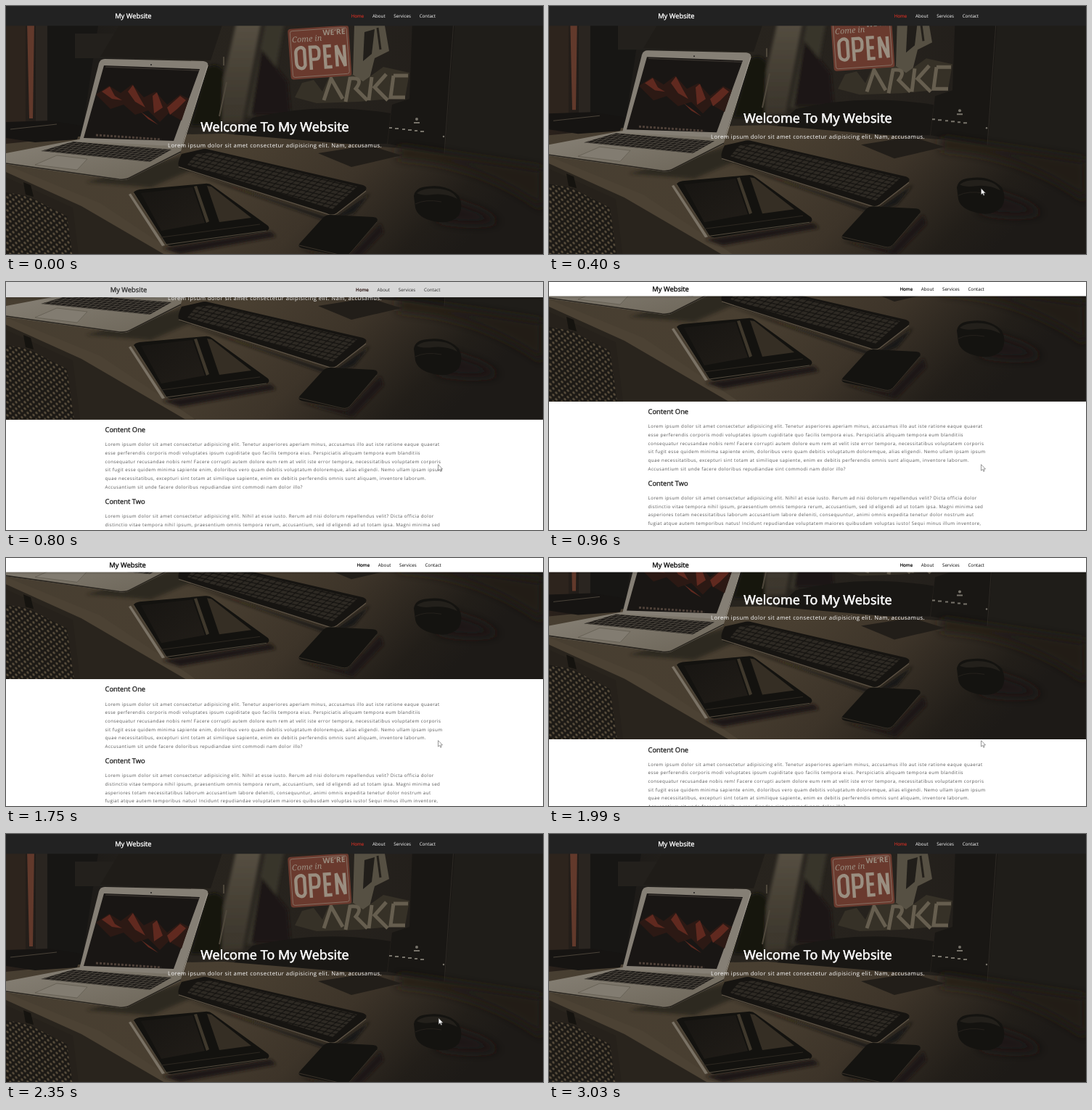
An HTML page for the animation above (3730 ms loop, 740 by 342 pixels).

```html
<!DOCTYPE html>
<html lang="en">
<head>
<meta charset="utf-8">
<title>My Website</title>
<style>
  * { box-sizing: border-box; margin: 0; padding: 0; }
  html, body { width: 100%; height: 100%; overflow: hidden; background: #fff; }
  body { position: relative; font: 16px "Open Sans", sans-serif; text-rendering: geometricPrecision; }
  #page { position: absolute; left: 0; top: 0; width: 1900px; height: 880px; overflow: hidden;
    transform: scale(.39); transform-origin: 0 0; color: #222; }
  #scroll { position: absolute; left: 0; top: 0; width: 100%; }
  .fat { font-weight: 400; -webkit-text-stroke: .035em currentColor; }
  .box { width: 1200px; margin: 0 auto; }

  nav { position: absolute; left: 0; top: 0; width: 100%; }
  nav .box { display: flex; justify-content: space-between; align-items: center; height: 100%; }
  nav h1 { font-size: 24px; }
  nav ul { display: flex; gap: 30px; list-style: none; }

  .hero { position: relative; height: 922px; color: #fff; text-align: center; padding-top: 396px; overflow: hidden; }
  .hero svg { position: absolute; left: 0; top: 0; width: 1897.4px; height: 922px; }
  .hero { background: #1e1b17; }
  .hero h1, .hero p { position: relative; white-space: nowrap; }
  .hero h1 { font-size: 46px; line-height: 63px; letter-spacing: .25px; margin-bottom: 20px; }
  .hero p { font-size: 20px; line-height: 27px; letter-spacing: 1px; }

  .content { display: flow-root; }
  .content h2 { font-size: 24px; line-height: 33px; margin: 20px 0; }
  .content p { color: #555; line-height: 30px; letter-spacing: 1.2px; white-space: nowrap; }

  #cursor { position: absolute; left: 0; top: 0; width: 8px; height: 12px; overflow: visible; }
</style>
</head>
<body>
<div id="page">
  <div id="scroll">
    <section class="hero">
      <svg viewBox="0 0 740 359.6" preserveAspectRatio="none">
        <defs>
          <linearGradient id="wall">
            <stop offset="0" stop-color="#2a211b"/><stop offset=".1" stop-color="#1b1917"/>
            <stop offset=".35" stop-color="#28241e"/><stop offset=".6" stop-color="#26221d"/>
            <stop offset="1" stop-color="#1f1c19"/>
          </linearGradient>
          <linearGradient id="desk" x1="0" y1="0" x2="1" y2=".25">
            <stop offset="0" stop-color="#473e31"/><stop offset=".45" stop-color="#493f31"/>
            <stop offset=".68" stop-color="#3d3429"/><stop offset=".9" stop-color="#221e19"/>
            <stop offset="1" stop-color="#1d1a17"/>
          </linearGradient>
          <linearGradient id="metal" x1="0" y1="0" x2="1" y2="1">
            <stop offset="0" stop-color="#878176"/><stop offset="1" stop-color="#6c6558"/>
          </linearGradient>
          <linearGradient id="glass" x1="0" y1="0" x2="1" y2="1">
            <stop offset="0" stop-color="#171512"/><stop offset="1" stop-color="#211d18"/>
          </linearGradient>
          <linearGradient id="sheen" x1="0" y1="0" x2="0" y2="1">
            <stop offset="0" stop-color="#645c4d" stop-opacity=".8"/><stop offset="1" stop-color="#4a4336" stop-opacity=".55"/>
          </linearGradient>
          <pattern id="keys" width="9" height="7" patternUnits="userSpaceOnUse" patternTransform="matrix(.97 .235 -.72 .6 250 205)">
            <rect x=".7" y=".7" width="7.6" height="5.4" rx="1" fill="#2d2923"/>
          </pattern>
          <pattern id="caps" width="7.2" height="5" patternUnits="userSpaceOnUse" patternTransform="matrix(.99 .1 -.85 .5 100 187)">
            <rect width="7.2" height="5" fill="#5d574d"/><rect x=".4" y=".4" width="6.3" height="4.1" fill="#1f1c19"/>
          </pattern>
          <pattern id="holes" width="8" height="9" patternUnits="userSpaceOnUse" patternTransform="skewY(20)">
            <circle cx="2" cy="2.2" r="1.7" fill="#584d3c"/><circle cx="6" cy="6.7" r="1.7" fill="#584d3c"/>
          </pattern>
          <filter id="edge"><feGaussianBlur stdDeviation=".7"/></filter>
          <filter id="soft" x="-30%" y="-30%" width="160%" height="160%"><feGaussianBlur stdDeviation="2"/></filter>
          <filter id="haze" x="-50%" y="-50%" width="200%" height="200%"><feGaussianBlur stdDeviation="7"/></filter>
        </defs>

        <rect width="740" height="360" fill="url(#wall)"/>
        <g filter="url(#edge)">
          <path d="M0 20H27V165H0z" fill="#2d241d"/>
          <path d="M29 20H39L37 155H32z" fill="#62392b"/>
          <path d="M41 20H57V160H41z" fill="#2a2520"/>
          <path d="M57 20H128L104 180H57z" fill="#171614"/>
          <path d="M95 38H158V72H95z" fill="#23201c"/>
          <path d="M160 20H300L282 75 130 70z" fill="#1f1c18"/>
        </g>
        <g filter="url(#soft)">
          <path d="M318 20H352L326 160 284 162 300 100z" fill="url(#sheen)"/>
          <path d="M358 20H384L366 120 340 152H332z" fill="#39342a"/>
          <path d="M276 85Q292 76 300 90L297 165H254z" fill="#151311"/>
          <path d="M352 60L388 104 392 150H338z" fill="#1c1916"/>
        </g>
        <g filter="url(#edge)">
          <path d="M300 82V70M304 105L294 152" stroke="#4f483c" stroke-width="2"/>
          <path d="M480 27H522L528 62 508 72 498 112 478 96z" fill="#565043"/>
          <path d="M494 36L508 32 504 66 492 76z" fill="#211e1a"/>
          <path d="M512 30L516 60" stroke="#24201b" stroke-width="3"/>
          <path d="M398 126L408 106 424 102 436 118 446 96 474 92 492 104 520 84 556 92 550 126 486 132 428 134z" fill="#363127"/>
          <path d="M438 130L448 100 464 128M468 132L474 100Q494 98 482 114L498 130M504 98L500 130M524 94L508 112 526 130M534 96H554M534 96L530 126H550" fill="none" stroke="#665e4f" stroke-width="5"/>
          <path d="M340 154Q430 132 530 148L525 190H300z" fill="#191714"/>
        </g>
        <path d="M560 20H619L605 204 526 190 532 136 556 128z" fill="#191714"/>
        <path d="M619 20H740V240L605 205z" fill="#1f1d19"/>
        <path d="M617 20L604 204" stroke="#2f2b26" stroke-width="1"/>
        <g fill="#77736a">
          <circle cx="566" cy="156" r="2"/><path d="M562 160h8v2h-8zM528 167h4v2h-4zM536 168h5v2h-5zM546 169h4v2h-4zM554 170h5v2h-5zM563 171h4v2h-4zM571 172h5v2h-5z"/>
          <circle cx="603" cy="180" r="1.2"/>
        </g>

        <g transform="translate(388 32) rotate(-4)">
          <rect width="84" height="70" rx="4" fill="#6a3a2e"/>
          <rect x="3" y="3" width="78" height="64" rx="3" fill="none" stroke="#8c7a6c" stroke-width=".8"/>
          <g fill="#9a8e80" font-family="Open Sans, sans-serif">
            <text x="5" y="19" font-size="11" font-style="italic" font-family="Noto Serif, serif">Come in</text>
            <text x="48" y="12" font-size="10.5" font-weight="700">WE’RE</text>
          </g>
          <path d="M12 28Q18 24 21 30V51Q18 58 12 54Q9 52 9 46V34Q9 30 12 28zM29 58V27H37Q42 29 41 36Q41 44 36 44H29M58 27H49V56H58M49 41H57M65 56V27L76 56V27"
            fill="none" stroke="#9a8e80" stroke-width="4.4"/>
        </g>

        <path d="M0 190L100 180 300 176 540 196 740 226V360H0z" fill="url(#desk)"/>
        <path d="M540 194L740 224V280Q650 215 540 210z" fill="#211d18" filter="url(#haze)"/>
        <path d="M0 160L60 158 104 165 98 184 40 188 0 182z" fill="#161412"/>
        <path d="M6 170L70 163" stroke="#4b443a"/>

        <path d="M0 224L110 275 232 342 262 360H0z" fill="#29241d"/>
        <path d="M0 219L130 272 262 360H248L104 276 0 229z" fill="#4c4234"/>
        <path d="M0 236L92 278 102 360H0z" fill="#26211b"/>
        <path d="M0 257L30 262 84 290 94 360H0z" fill="#1c1915"/>
        <path d="M0 257L30 262 84 290 94 360H0z" fill="url(#holes)"/>
        <path d="M24 243L34 247 38 263 27 260z" fill="#15130f"/>

        <path d="M110 243L248 205 270 220 200 250z" fill="#1e1a16" opacity=".6" filter="url(#soft)"/>
        <path d="M0 203L100 184 243 194 240 203 172 237Q166 241 156 240L0 218z" fill="url(#metal)"/>
        <path d="M0 217L156 239Q166 240 172 236L241 201" fill="none" stroke="#28241e" stroke-width="1.6"/>
        <path d="M92 187L228 198 198 215 48 200z" fill="url(#caps)"/>
        <path d="M70 206L112 211 98 226 40 219z" fill="#827c71" stroke="#5a5449" stroke-width=".6"/>
        <path d="M136 73L272 76Q280 77 278 84L242 194 101 186 128 79Q130 73 136 73z" fill="#857f75"/>
        <path d="M278 82L243 194" stroke="#a09a8f" stroke-width="1"/>
        <path d="M135 82L267 87 231 186 107 182z" fill="#191614"/>
        <g filter="url(#edge)">
          <path d="M124 122L142 110 158 120 174 108 190 126 206 118 222 136 240 122 252 128 242 158 224 148 212 160 196 144 178 150 162 136 144 142z" fill="#2c1914"/>
          <path d="M132 118L143 111 150 124 160 130 146 128zM168 118L175 109 184 126 192 140 178 132zM202 124L208 119 216 140 204 148zM222 140L240 124 248 130 236 142 226 150zM186 146L200 156 210 164 196 156z" fill="#60291f"/>
        </g>
        <path d="M137 84L266 89" stroke="#37322d" stroke-width="1.4"/>
        <path d="M124 178L214 184" stroke="#4d4038" stroke-width="3" stroke-dasharray="3 2"/>
        <circle cx="200" cy="81" r="1" fill="#23211f"/>

        <path d="M430 203L500 192 545 206 476 222z" fill="#221e19" filter="url(#edge)"/>
        <path d="M236 224L450 294 502 258 480 285 448 298z" fill="#191612" filter="url(#soft)"/>
        <path d="M242 204L268 198Q274 196 280 198L492 247Q500 250 494 256L456 286Q450 290 442 287L240 224Q234 220 242 204z" fill="#161411"/>
        <path d="M262 204L286 202 484 249 450 280 250 219z" fill="url(#keys)"/>
        <path d="M238 222L443 287Q450 290 456 286L496 255" fill="none" stroke="#5d5345" stroke-width="1.3"/>

        <path d="M215 334L365 311 372 318 240 342z" fill="#1c1813" filter="url(#soft)"/>
        <path d="M169 260L172 258.5 219 330 215 331z" fill="#7a7265"/>
        <path d="M176 257Q178 254 184 253L274 245Q280 244 285 248L361 303Q365 308 358 311L228 331Q221 331 217 324z" fill="#13120f"/>
        <path d="M186 258L257 250 274 299 214 310z" fill="url(#glass)"/>
        <path d="M259 249L263 248 280 297 276 299z" fill="#3f382c"/>
        <path d="M277 248L283 249 338 292 294 298z" fill="#352e24"/>
        <path d="M176 258L221 329 359 310" fill="none" stroke="#544c3f" stroke-width="1"/>
        <path d="M214 319L350 301" stroke="#2e2922"/>

        <path d="M402 335L470 348 516 300 520 312 478 356z" fill="#1a1713" filter="url(#soft)"/>
        <path d="M436 293Q440 288 447 288L506 291Q514 292 511 298L476 340Q471 347 463 345L408 334Q401 332 405 327z" fill="#141310"/>
        <path d="M404 330L463 344Q471 346 476 339L511 298" fill="none" stroke="#3a332a" stroke-width="1"/>

        <path d="M590 294Q630 306 680 298L655 282 615 268z" fill="#1a1713" filter="url(#haze)"/>
        <path d="M562 262Q564 250 580 249Q608 245 624 262Q631 276 624 289Q612 302 590 297Q567 292 564 278z" fill="#141310"/>
        <path d="M566 258Q576 250 598 252Q616 254 622 266Q606 258 588 260Q574 262 566 258z" fill="#23201b"/>
        <path d="M564 273Q578 266 600 270" fill="none" stroke="#26221d" stroke-width="1"/>
      </svg>
      <h1 class="fat">Welcome To My Website</h1>
      <p>Lorem ipsum dolor sit amet consectetur adipisicing elit. Nam, accusamus.</p>
    </section>
    <section class="box content">
      <h2 class="fat">Content One</h2>
      <p>Lorem ipsum dolor sit amet consectetur adipisicing elit. Tenetur asperiores aperiam minus, accusamus illo aut iste ratione eaque quaerat<br>
      esse perferendis corporis modi voluptates ipsum cupiditate quo facilis tempora eius. Perspiciatis aliquam tempora eum blanditiis<br>
      consequatur recusandae nobis rem! Facere corrupti autem dolore eum rem at velit iste error tempora, necessitatibus voluptatem corporis<br>
      sit fugit esse quidem minima sapiente enim, doloribus vero quam debitis voluptatum doloremque, alias eligendi. Nemo ullam ipsam ipsum<br>
      quae necessitatibus, excepturi sint totam at similique sapiente, enim ex debitis perferendis omnis sunt aliquam, inventore laborum.<br>
      Accusantium sit unde facere doloribus repudiandae sint commodi nam dolor illo?</p>
      <h2 class="fat">Content Two</h2>
      <p>Lorem ipsum dolor sit amet consectetur adipisicing elit. Nihil at esse iusto. Rerum ad nisi dolorum repellendus velit? Dicta officia dolor<br>
      distinctio vitae tempora nihil ipsum, praesentium omnis tempora rerum, accusantium, sed id eligendi ad ut totam ipsa. Magni minima sed<br>
      asperiores totam necessitatibus laborum accusantium labore deleniti, consequuntur, animi omnis expedita tenetur dolor nostrum aut<br>
      fugiat atque autem temporibus natus! Incidunt repudiandae voluptatem maiores quibusdam voluptas iusto! Sequi minus illum inventore,<br>
      placeat dolorem fuga laboriosam ea odio nulla quos esse, beatae harum.</p>
    </section>
  </div>
  <nav id="nav">
    <div class="box" id="bar">
      <h1 class="fat">My Website</h1>
      <ul><li class="fat" id="home">Home</li><li>About</li><li>Services</li><li>Contact</li></ul>
    </div>
  </nav>
</div>
<svg id="cursor" viewBox="0 0 8 12"><path d="M0 0V8.4L2 6.6 3.3 9.6 4.6 9 3.4 6.2H6z" fill="#fff" stroke="#555" stroke-width=".6"/></svg>

<script>
  const LOOP = 3730;
  const $ = id => document.getElementById(id);

  // Each track is a list of [time, value] points.
  const scrollY = [[330, 0], [390, 20], [600, 231], [640, 276], [800, 436], [960, 500],
    [1710, 500], [1750, 494], [1990, 281], [2150, 77], [2270, 0]];
  const active = [[620, 0], [640, .05], [720, .5], [800, .82], [920, 1],
    [2030, 1], [2050, .94], [2130, .45], [2190, .15], [2270, 0]];
  const cursorX = [[80, 596], [330, 595.5], [2310, 595.5], [2350, 596.2], [2550, 596.2], [3030, 580]];
  const cursorY = [[80, 345], [330, 251.7], [2310, 251.7], [2350, 254], [2550, 254], [3030, 345]];

  const mix = (a, b, k) => a + (b - a) * k;
  const rgb = (a, b, k) => `rgb(${a.map((v, i) => Math.round(mix(v, b[i], k)))})`;

  function at(track, t) {
    const i = track.findIndex(p => p[0] > t);
    if (i === 0) return track[0][1];
    if (i < 0) return track[track.length - 1][1];
    const [t0, a] = track[i - 1], [t1, b] = track[i];
    return mix(a, b, (t - t0) / (t1 - t0));
  }

  function draw(now) {
    let t = now % LOOP;
    // Motion advances in 40 ms steps, restarted at 1750 ms.
    const base = t < 1750 ? 0 : 1750;
    t = base + Math.floor((t - base) / 40) * 40;

    const k = at(active, t);
    $('scroll').style.transform = `translateY(${-at(scrollY, t)}px)`;
    const nav = $('nav').style;
    nav.height = mix(70, 50, k) + 'px';
    nav.background = rgb([34, 34, 34], [255, 255, 255], k);
    nav.color = rgb([255, 255, 255], [0, 0, 0], k);
    nav.boxShadow = `0 2px 10px rgba(0,0,0,${.3 * k})`;
    $('bar').style.padding = `0 ${mix(32, 12, k)}px 0 ${mix(35, 15, k)}px`;
    $('home').style.color = rgb([184, 46, 36], [0, 0, 0], k);
    $('cursor').style.transform = `translate(${at(cursorX, t)}px, ${at(cursorY, t)}px)`;
  }

  let start;
  function tick(now) {
    start ??= now;
    draw(now - start);
    requestAnimationFrame(tick);
  }
  draw(0);
  requestAnimationFrame(tick);
</script>
</body>
</html>
```
